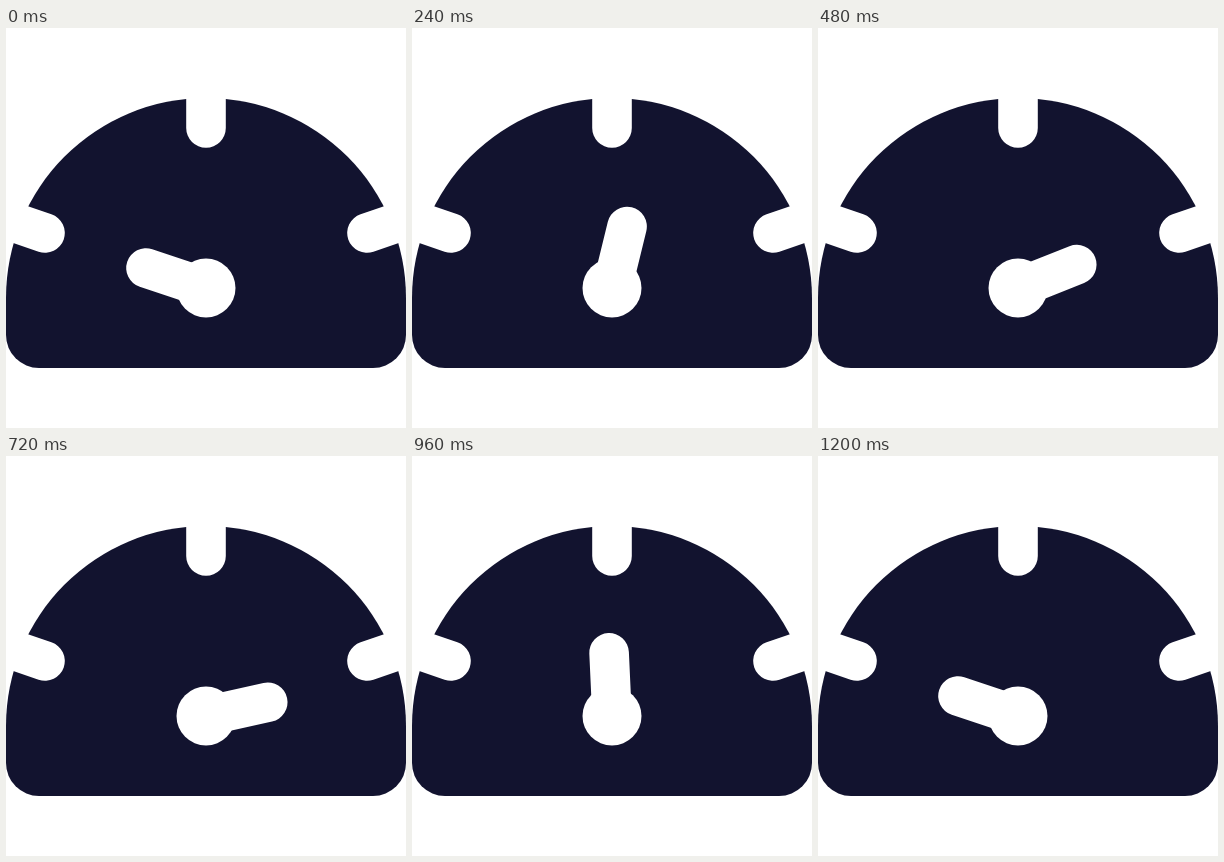
These frames come from a looping animation (400 by 400 pixels, 3.23 s). An HTML page:

```html
<!DOCTYPE html>
<html lang="en">
<head>
<meta charset="utf-8">
<title>Gauge</title>
<style>
  html, body { margin: 0; width: 100%; height: 100%; overflow: hidden; background: #fff; }
  svg { display: block; width: 100%; height: 100%; }
  .body { fill: #12132f; }
  .cut { fill: none; stroke: #fff; stroke-width: 39.6; stroke-linecap: round; }
  .hub { fill: #fff; }
</style>
</head>
<body>
<svg viewBox="0 0 400 400">
  <path class="body" d="M0 270A200 200 0 0 1 400 270V307A33 33 0 0 1 367 340H33A33 33 0 0 1 0 307Z"/>
  <path class="cut" d="M200 100V40M39 205L-18 185.5M361 205L418 185.5"/>
  <path class="cut" id="needle" d="M200 260L140 240"/>
  <circle class="hub" cx="200" cy="260" r="29.5"/>
</svg>
<script>
  const LOOP = 3230, STEP = 30, PEAK = 720, END = 1200, SWEEP = 149;
  const needle = document.getElementById('needle');

  // Cubic bezier easing with control points (a, 0) and (b, 1)
  function ease(a, b) {
    return p => {
      let lo = 0, hi = 1;
      for (let i = 0; i < 24; i++) {
        const s = (lo + hi) / 2, r = 1 - s;
        const x = 3 * a * s * r * r + 3 * b * s * s * r + s * s * s;
        if (x < p) lo = s; else hi = s;
      }
      return lo * lo * (3 - 2 * lo);
    };
  }

  const rise = ease(0.38, 0.1);
  const fall = ease(0.58, 0.38);

  function angle(t) {
    if (t >= END) return 0;
    return SWEEP * (t < PEAK ? rise(t / PEAK) : 1 - fall((t - PEAK) / (END - PEAK)));
  }

  function draw() {
    // The needle ticks in steps, then rests until the loop ends
    const t = Math.floor((performance.now() % LOOP) / STEP) * STEP;
    needle.setAttribute('transform', `rotate(${angle(t).toFixed(3)} 200 260)`);
    requestAnimationFrame(draw);
  }
  draw();
</script>
</body>
</html>
```
